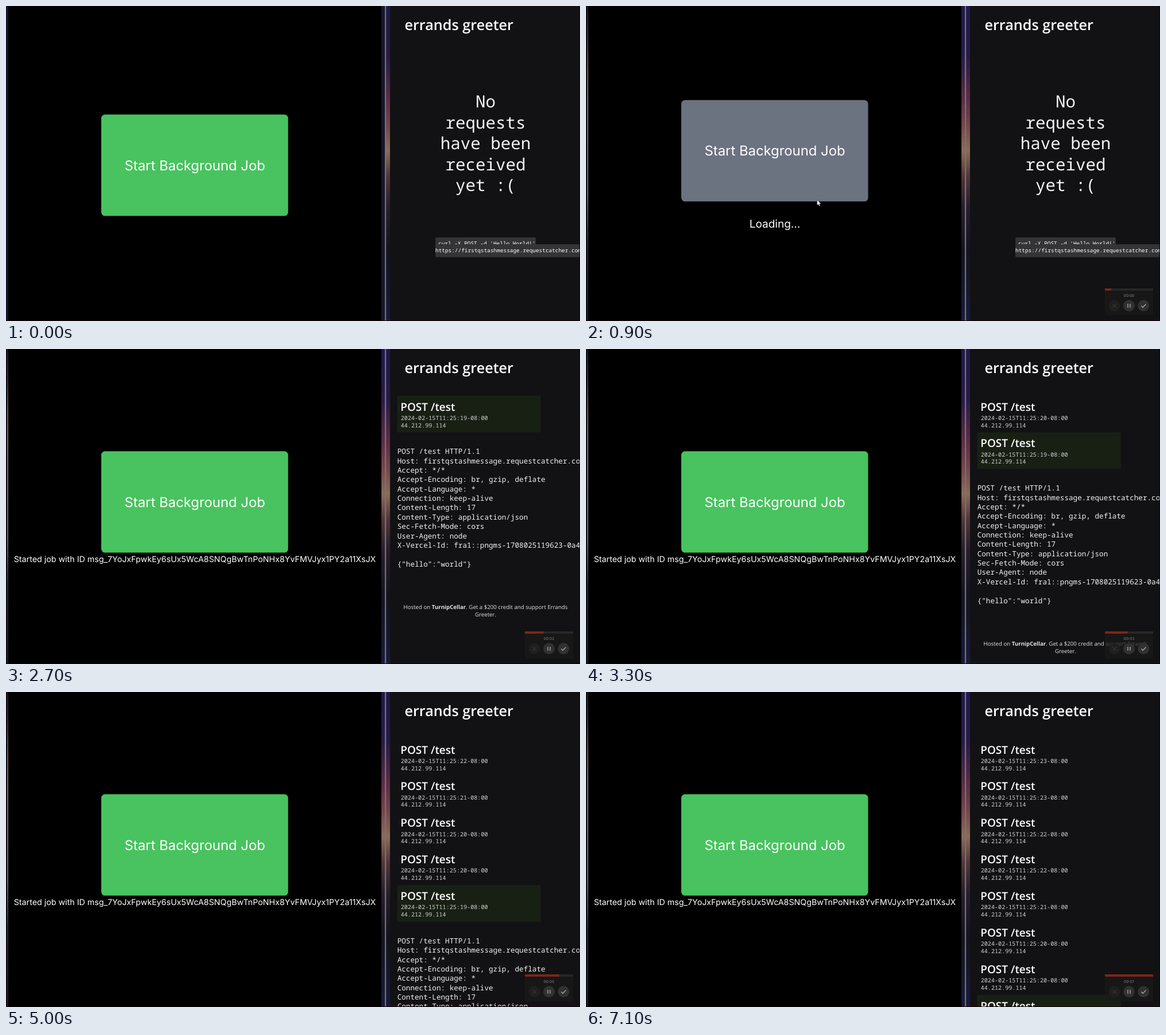
An HTML page for the animation above (7200 ms loop, 1000 px wide and 550 px high).

```html
<!DOCTYPE html>
<html lang="en">
<head>
<meta charset="utf-8">
<title>Background job demo</title>
<style>
  html, body { margin: 0; width: 100%; height: 100%; overflow: hidden; background: #000; }
  svg { display: block; width: 100vw; height: 100vh; }
  text { fill: #fff; white-space: pre; text-rendering: geometricPrecision; }
  .inter { font-family: Inter, sans-serif; text-anchor: middle; }
  .open { font-family: "Open Sans", sans-serif; }
  .mono { font-family: "Noto Sans Mono", "DejaVu Sans Mono", monospace; }
  .semi { font-weight: 600; }
  .mid { text-anchor: middle; }
  .notice { font-size: 29.2px; fill: #f4f4f4; }
  .curl { font-size: 9.42px; font-weight: 500; }
  .meta { font-size: 10.13px; fill: #d2d2d2; }
  .dump { font-size: 12.65px; fill: #f2f2f2; }
  .foot { font-size: 9.7px; fill: #e4e4e4; }
</style>
</head>
<body>
<svg viewBox="0 0 1000 550" preserveAspectRatio="none">
  <defs>
    <linearGradient id="wall" x2="0" y2="1">
      <stop offset="0" stop-color="#1e194a"/>
      <stop offset=".16" stop-color="#281b48"/>
      <stop offset=".3" stop-color="#5e2e46"/>
      <stop offset=".38" stop-color="#74464a"/>
      <stop offset=".46" stop-color="#8a6c59"/>
      <stop offset=".54" stop-color="#523639"/>
      <stop offset=".64" stop-color="#281e2d"/>
      <stop offset=".78" stop-color="#14131f"/>
      <stop offset="1" stop-color="#191b3c"/>
    </linearGradient>
    <linearGradient id="edge" x2="0" y2="1">
      <stop offset="0" stop-color="#1c1826"/>
      <stop offset=".1" stop-color="#4a2c30"/>
      <stop offset=".2" stop-color="#80563f"/>
      <stop offset=".3" stop-color="#77706a"/>
      <stop offset=".6" stop-color="#6a6a6c"/>
      <stop offset=".75" stop-color="#2c2c34"/>
      <stop offset="1" stop-color="#1c1c24"/>
    </linearGradient>
  </defs>

  <rect width="1000" height="550"/>
  <rect width="4" height="550" fill="#14142a"/>
  <g id="sideGlow">
    <rect width="2" height="550" fill="#0d0d14"/>
    <rect x="2" width="2" height="550" fill="url(#edge)"/>
  </g>

  <g id="button">
    <rect id="face" x="166" width="325.5" height="177" rx="6.5"/>
    <text class="inter" x="329" y="97" font-size="23.85">Start Background Job</text>
  </g>
  <text id="loading" class="inter" x="329" y="386.5" font-size="19">Loading...</text>
  <text id="started" class="inter" x="329" y="371.8" font-size="14.26">Started job with ID msg_7YoJxFpwkEy6sUx5WcA8SNQgBwTnPoNHx8YvFMVJyx1PY2a11XsJX</text>
  <path id="cursor" d="M402.5 338.5v9.6l2.2-2 1.5 3.3 1.7-.8-1.4-3.2h3z" fill="#fff" stroke="#222" stroke-width=".6"/>

  <rect x="654" width="15" height="550" fill="url(#wall)"/>
  <rect id="dimStrip" x="654" width="6" height="550" fill="#16162c"/>
  <rect x="660" width="2.2" height="550" fill="#747476"/>
  <rect x="669" width="331" height="550" fill="#121214"/>
  <text class="open semi" x="694.5" y="42" font-size="25.2">errands greeter</text>

  <g id="empty">
    <g id="notice"></g>
    <rect x="748" y="404" width="175" height="22" rx="2" fill="#343436"/>
    <text class="mono curl" x="753" y="418">curl -X POST -d 'Hello World!'</text>
    <rect x="748" y="416" width="260" height="22.5" rx="2" fill="#343436"/>
    <text class="mono curl" x="748" y="430.4">https://firstqstashmessage.requestcatcher.com/test</text>
  </g>

  <g id="rows"></g>
  <g id="detail">
    <g id="dump"></g>
    <text class="open foot mid" x="835.5" y="518">Hosted on <tspan font-weight="700">TurnipCellar</tspan>. Get a $200 credit and support Errands</text>
    <text class="open foot mid" x="835.5" y="530.6">Greeter.</text>
  </g>
  <rect x="999" width="1" height="550" fill="#08080a"/>
  <rect y="549" width="1000" height="1" fill="#10060c"/>

  <g id="recorder">
    <rect x="904" y="493" width="84" height="47" rx="2" fill="#1a1a1a" fill-opacity=".72"/>
    <rect x="904" y="493" width="84" height="4" rx="1" fill="#272727"/>
    <rect id="bar" x="904" y="493" height="4" rx="1" fill="#7c2814"/>
    <text id="clock" class="inter" x="946" y="507.8" font-size="6.6" style="fill:#808080"></text>
    <circle cx="920.5" cy="523.3" r="10" fill="#1f1f1f"/>
    <circle cx="946" cy="523.3" r="10" fill="#313131"/>
    <circle cx="971.3" cy="523.3" r="10" fill="#313131"/>
    <g fill="none" stroke-width="1.4">
      <path d="M917 520l7 7m0-7l-7 7" stroke="#38302e"/>
      <path d="M944 520v6.8m4-6.8v6.8" stroke="#a8a8a8"/>
      <path d="M967.4 523.4l2.7 2.8 5.2-5.4" stroke="#a8a8a8"/>
    </g>
  </g>
</svg>
<script>
const LOOP = 7200, STEP = 100, ROW = 63.9;
const CLICK = 300, DONE = 1300;
const FIRST = 2600, EVERY = 600;
const seconds = [19, 20, 20, 21, 22, 22, 23, 23];
const $ = id => document.getElementById(id);

function add(parent, tag, attrs, text = '') {
  const el = document.createElementNS('http://www.w3.org/2000/svg', tag);
  for (const k in attrs) el.setAttribute(k, attrs[k]);
  el.textContent = text;
  return parent.appendChild(el);
}

function lines(parent, list, cls, x, y, gap) {
  list.forEach((s, i) => add(parent, 'text', { class: cls, x, y: y + i * gap }, s));
}

lines($('notice'), ['No', 'requests', 'have been', 'received', 'yet :('],
  'mono notice mid', 835.5, 177.4, 36.45);

lines($('dump'), [
  'POST /test HTTP/1.1',
  'Host: firstqstashmessage.requestcatcher.com',
  'Accept: */*',
  'Accept-Encoding: br, gzip, deflate',
  'Accept-Language: *',
  'Connection: keep-alive',
  'Content-Length: 17',
  'Content-Type: application/json',
  'Sec-Fetch-Mode: cors',
  'User-Agent: node',
  'X-Vercel-Id: fra1::pngms-1708025119623-0a4',
  '',
  '{"hello":"world"}'
], 'mono dump', 681.7, 247.3, 16.35);

const rows = seconds.map((s, i) => {
  const g = add($('rows'), 'g', {});
  if (i === 0) add(g, 'rect', { x: 681.5, y: 81.7, width: 250, height: ROW, fill: '#182014' });
  add(g, 'text', { class: 'open semi', x: 687.2, y: 107.6, 'font-size': 19 }, 'POST /test');
  lines(g, [`2024-02-15T11:25:${s}-08:00`, '44.212.99.114'], 'mono meta', 687.7, 123.8, 12.8);
  return g;
});

const show = (el, on) => el.setAttribute('display', on ? 'inline' : 'none');
const shift = (el, y) => el.setAttribute('transform', `translate(0 ${y})`);

function draw(t) {
  const busy = t >= CLICK && t < DONE;
  const top = t < CLICK ? 189.6 : busy ? 164.3 : 178.6;
  shift($('button'), top);
  $('face').setAttribute('fill', busy ? '#6b7280' : '#48c35f');
  show($('loading'), busy);
  show($('started'), t >= DONE);
  show($('cursor'), t > 0 && t < DONE);

  const live = t > 0;
  show($('sideGlow'), live);
  show($('dimStrip'), !live);
  show($('recorder'), live);
  $('bar').setAttribute('width', 84 * Math.min(1, t / 7000));
  $('clock').textContent = '00:0' + Math.floor(t / 1000);

  const count = t < FIRST ? 0 : Math.min(seconds.length, 1 + Math.floor((t - FIRST) / EVERY));
  show($('empty'), !count);
  show($('detail'), count);
  shift($('detail'), (count - 2) * ROW);
  rows.forEach((row, i) => {
    show(row, i < count);
    shift(row, (count - 1 - i) * ROW);
  });
}

function tick() {
  const t = performance.now() % LOOP;
  draw(Math.floor(t / STEP) * STEP);
  requestAnimationFrame(tick);
}
tick();
</script>
</body>
</html>
```
